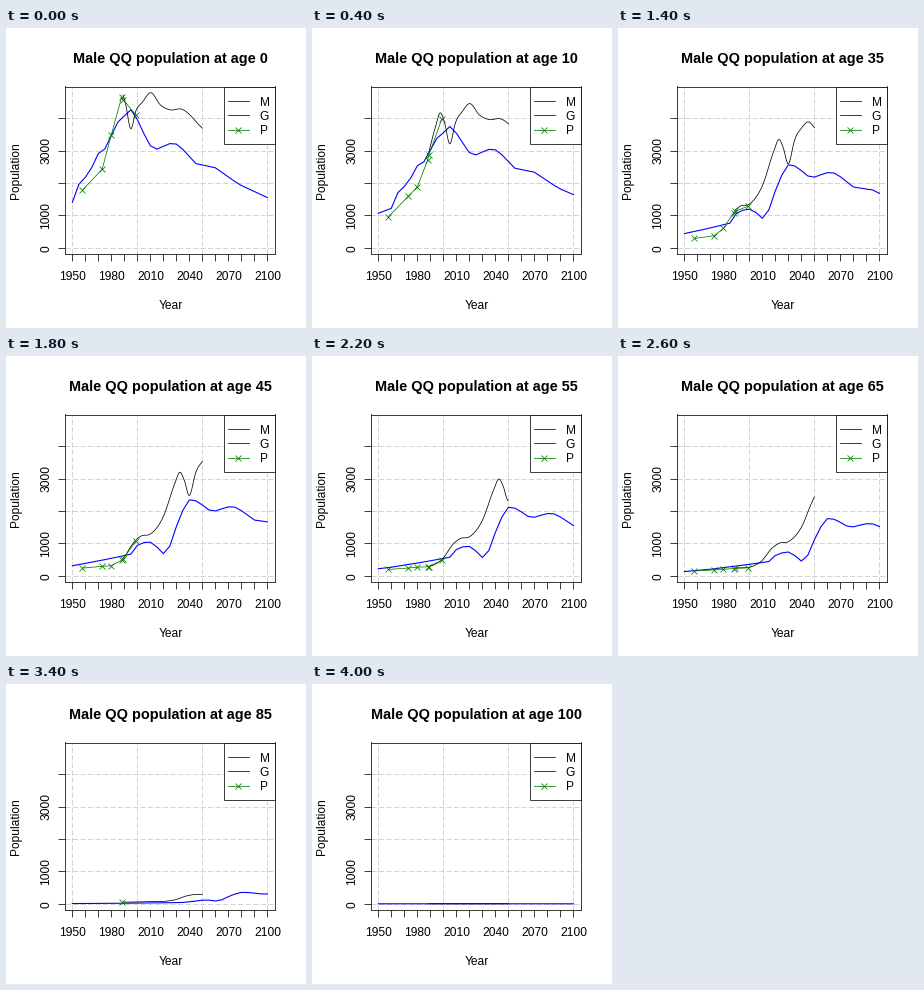
These frames come from a looping animation (300 px wide and 300 px high, 4200 ms). A matplotlib script:

```python
import matplotlib.pyplot as plt
import numpy as np
from matplotlib.animation import FuncAnimation
from matplotlib.patches import Rectangle

SIZE, DPI = 300, 100
PX = 72 / DPI  # points per pixel
GREEN = "#007a00"
LEFT, RIGHT, TOP, BOTTOM = 58.5, 269.2, 58.5, 226.0
THIN = 0.75 * PX

# Turning points (birth year, cohort size) of the two projections
model_births = [(1850, 180), (1885, 420), (1905, 650), (1930, 1050),
                (1950, 1400), (1955, 1955), (1963, 2310), (1970, 2910),
                (1975, 3050), (1985, 3880), (1995, 4260), (2000, 3960),
                (2009, 3180), (2014, 3030), (2027, 3250), (2032, 3170),
                (2045, 2600), (2060, 2470), (2078, 1960), (2100, 1550)]
smooth_births = [(1890, 270), (1925, 440), (1938, 550), (1944, 810),
                 (1953, 1600), (1958, 1840), (1965, 1930), (1975, 2740),
                 (1984, 4300), (1987.7, 4790), (1991, 4430), (1994.8, 3680),
                 (1999, 4240), (2004, 4500), (2010, 4787), (2018, 4400),
                 (2025, 4260), (2034, 4280), (2050, 3690)]

# Census year and the oldest age it reports
censuses = [(1957.8, 80), (1973, 80), (1980, 80),
            (1987.9, 85), (1989, 80), (1998.9, 80)]


def hermite(points, x):
    """Smooth curve through the points, flat beyond both ends."""
    px, py = np.array(points, float).T
    slope = np.gradient(py, px)
    x = np.clip(x, px[0], px[-1])
    i = np.clip(np.searchsorted(px, x) - 1, 0, len(px) - 2)
    h = px[i + 1] - px[i]
    t = (x - px[i]) / h
    return ((1 + 2 * t) * (1 - t) ** 2 * py[i] + t * (1 - t) ** 2 * h * slope[i]
            + t * t * (3 - 2 * t) * py[i + 1] + t * t * (t - 1) * h * slope[i + 1])


def logistic(x):
    return 1 / (1 + np.exp(-x))


def reaching_adulthood(age, born, gain, middle, width):
    """Share alive after childhood losses, improving for later births."""
    adult = 0.74 + gain * logistic((born - middle) / width)
    return 1 - (1 - adult) * min(age / 20, 1)


def model_population(age, year):
    born = year - age
    grown = max(age - 20, 0)
    births = np.interp(born, *np.transpose(model_births))
    children = reaching_adulthood(age, born, 0.15, 2003, 4)
    hazard = 0.04 * grown ** 0.6 + 1.7 * np.exp((age - 85) / 9)
    early = 1 + 0.5 * logistic((1962 - born) / 4)
    # Adults born around 1976 are hit hardest
    crisis = (0.65 * (1 - np.exp(-grown / 10))
              * np.exp(-((born - 1976) / 7.5) ** 2 / 1.0 * 0.5))
    return births * children * np.exp(-hazard * early) * (1 - crisis)


def smooth_population(age, year):
    born = year - age
    children = reaching_adulthood(age, born, 0.12, 1999, 1.5)
    hazard = 0.0035 * max(age - 20, 0) + 1.35 * np.exp((age - 85) / 9)
    return hermite(smooth_births, born) * children * np.exp(-hazard)


fig = plt.figure(figsize=(SIZE / DPI, SIZE / DPI), dpi=DPI, facecolor="white")
ax = fig.add_axes([LEFT / SIZE, 1 - BOTTOM / SIZE,
                   (RIGHT - LEFT) / SIZE, (BOTTOM - TOP) / SIZE])
ax.set(xlim=(1944, 2106), ylim=(-191.5, 4978.5))
ax.set_xticks(range(1950, 2101, 10), [])
ax.set_yticks(range(0, 4001, 1000), [])
ax.tick_params(length=7.2 * PX, width=THIN)
for spine in ax.spines.values():
    spine.set_linewidth(THIN)

grid_style = dict(color="#c6c6c6", lw=THIN, ls=(0, (7, 3)), zorder=0.5)
for year in range(1950, 2101, 50):
    ax.axvline(year, **grid_style)
for level in range(0, 4001, 1000):
    ax.axhline(level, **grid_style)

census_style = dict(color=GREEN, lw=THIN, marker="x", ms=6.36 * PX, mew=THIN)
model_line, = ax.plot([], [], color="blue", lw=1.1 * PX)
smooth_line, = ax.plot([], [], color="black", lw=THIN)
census_line, = ax.plot([], [], **census_style)

# Pixel-based layer for the legend and the lettering
layer = fig.add_axes([0, 0, 1, 1], facecolor="none")
layer.set(xlim=(0, SIZE), ylim=(SIZE, 0))
layer.axis("off")


def write(x, y, text, size=12, ha="center", **style):
    return layer.text(x, y, text, fontsize=size * PX, family="Liberation Sans",
                      ha=ha, va="baseline", rotation_mode="anchor", **style)


layer.add_patch(Rectangle((218.4, TOP), RIGHT - 218.4, 57.6,
                          fc="white", ec="black", lw=THIN))
for row, name in enumerate("MGP", start=1):
    y = TOP + 14.4 * row
    style = census_style if name == "P" else dict(color="black", lw=THIN)
    layer.plot([221.6, 243.2], [y, y], **{**style, "marker": None})
    if name == "P":
        layer.plot([232.4], [y], **style)
    write(253.6, y + 4.8, name, ha="left")

title = write(164.6, 35, "", size=14.5, weight="bold")
write(164.4, 281, "Year")
write(13, 142.6, "Population", rotation=90)
for year in range(1950, 2101, 30):
    write(66.8 + (year - 1950) * 1.3007, 252, str(year))
for level in (0, 1000, 3000):
    write(43, 220.2 - level * 0.0324, str(level), rotation=90)

model_years = np.arange(1950, 2101, 5)
smooth_years = np.arange(1989, 2050.1, 0.5)


def draw(frame):
    age = 5 * frame
    title.set_text(f"Male QQ population at age {age}")
    model_line.set_data(model_years, model_population(age, model_years))
    smooth_line.set_data(smooth_years, smooth_population(age, smooth_years))
    counted = np.array([year for year, oldest in censuses if age <= oldest])
    census_line.set_data(counted, 0.97 * smooth_population(age, counted))
    return title, model_line, smooth_line, census_line


animation = FuncAnimation(fig, draw, frames=21, interval=200, repeat=True,
                          repeat_delay=0)
plt.show()
```
